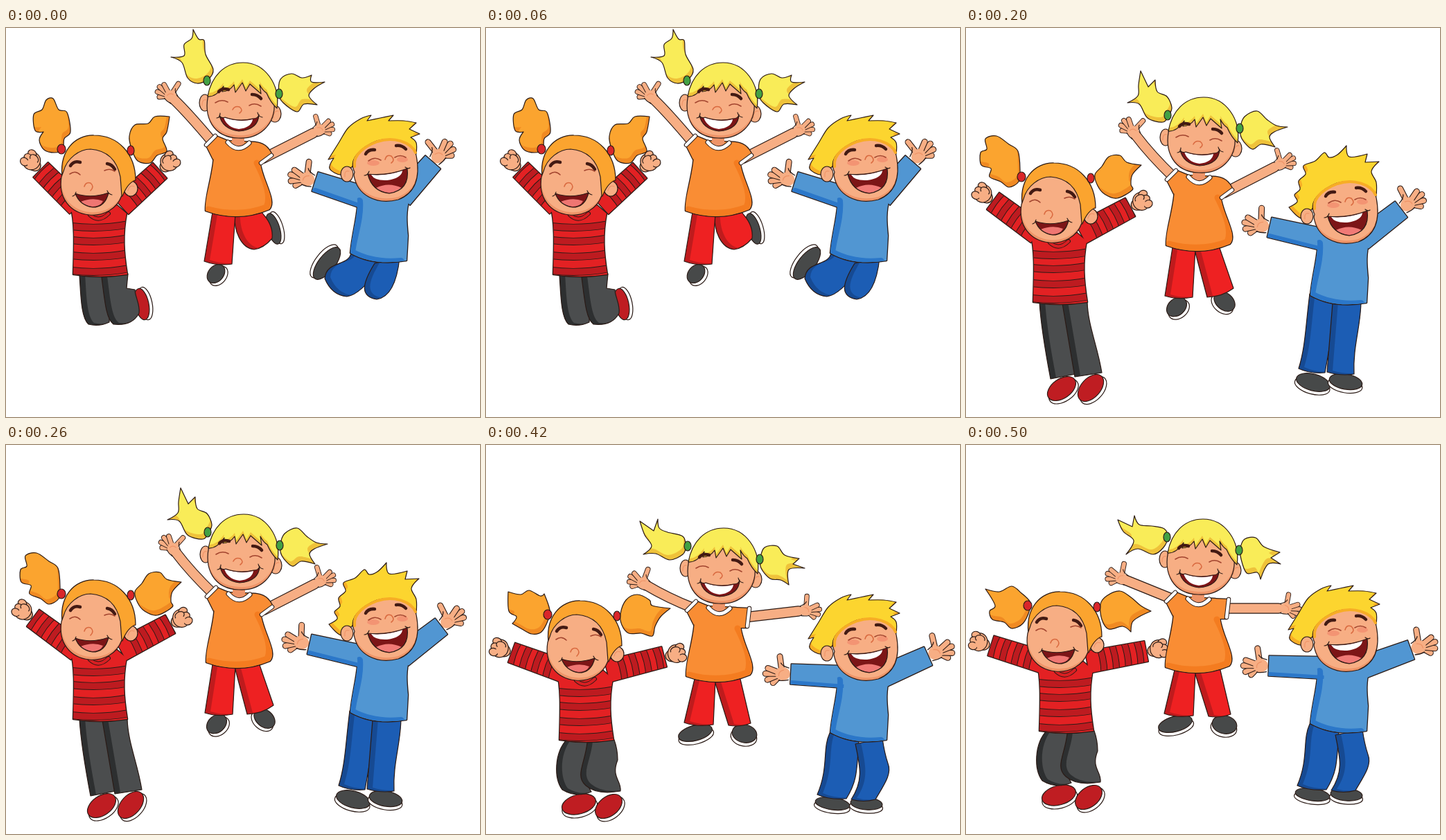
An HTML page with a canvas that plays this animation: 684 by 562 pixels, repeating every 0.6 s.

```html
<!DOCTYPE html>
<html lang="en">
<head>
<meta charset="utf-8">
<title>Jumping children</title>
<style>
html, body { margin: 0; width: 684px; height: 562px; overflow: hidden; background: #fff }
canvas { display: block }
</style>
</head>
<body>
<canvas width="684" height="562"></canvas>
<script>
const ctx = document.querySelector('canvas').getContext('2d');
const INK = '#2b1b16', SKIN = '#f7ae84', SKIN_DARK = '#ee9468', LIP = '#7c1517';
const path = d => new Path2D(d);
const points = s => s.split(',').map(p => p.trim().split(' ').map(Number));

function at(x, y, draw) {
  ctx.save();
  ctx.translate(x, y);
  draw();
  ctx.restore();
}

function line(d, color = INK, width = 1.2) {
  ctx.strokeStyle = color;
  ctx.lineWidth = width;
  ctx.stroke(typeof d === 'string' ? path(d) : d);
}

function fill(d, color) {
  ctx.fillStyle = color;
  ctx.fill(typeof d === 'string' ? path(d) : d);
}

// Fills a shape, leaving a darker band on the side opposite to (dx, dy).
function shade(d, light, dark, dx, dy) {
  const p = typeof d === 'string' ? path(d) : d;
  fill(p, dark);
  ctx.save();
  ctx.clip(p);
  ctx.translate(dx, dy);
  fill(p, light);
  ctx.restore();
  line(p);
}

function oval(x, y, rx, ry, color, outline = true) {
  const p = new Path2D();
  p.ellipse(x, y, rx, ry, 0, 0, 7);
  fill(p, color);
  if (outline) line(p);
}

// Closed smooth curve through points; sharp turns stay pointed.
function spline(s) {
  const pts = points(s), n = pts.length, p = new Path2D();
  const tangent = pts.map(([x, y], i) => {
    const [ax, ay] = pts[(i + n - 1) % n], [bx, by] = pts[(i + 1) % n];
    const dot = (x - ax) * (bx - x) + (y - ay) * (by - y);
    return dot < 0 ? [0, 0] : [(bx - ax) / 6, (by - ay) / 6];
  });
  p.moveTo(...pts[0]);
  pts.forEach(([x, y], i) => {
    const j = (i + 1) % n, [u, v] = pts[j];
    p.bezierCurveTo(x + tangent[i][0], y + tangent[i][1], u - tangent[j][0], v - tangent[j][1], u, v);
  });
  p.closePath();
  return p;
}

function sleeve([x, y], [u, v], w1, w2) {
  const a = Math.atan2(v - y, u - x), s = Math.sin(a) / 2, c = Math.cos(a) / 2, p = new Path2D();
  p.moveTo(x - s * w1, y + c * w1);
  p.lineTo(u - s * w2, v + c * w2);
  p.lineTo(u + s * w2, v - c * w2);
  p.lineTo(x + s * w1, y - c * w1);
  p.closePath();
  return p;
}

// Outlines all parts first so that they merge into one silhouette.
function merge(parts, color) {
  parts.forEach(p => line(p, INK, 2.6));
  parts.forEach(p => fill(p, color));
}

// Runs draw with the origin beyond the end of an arm and x along it; the thumb is at -y.
function handAt([x, y], [u, v], reach, left, draw) {
  at(u, v, () => {
    ctx.rotate(Math.atan2(v - y, u - x));
    ctx.translate(reach, 0);
    if (left) ctx.scale(1, -1);
    draw();
  });
}

function fist() {
  oval(-5, 1, 11, 9, SKIN);
  oval(0, 0, 12, 13, SKIN);
  [-8, 0, 8].forEach(y => oval(7, y, 6.5, 5.5, SKIN));
  oval(0, -5, 7, 5, SKIN);
  oval(-3, 2, 8, 7, SKIN, false);
}

function openHand(size) {
  ctx.scale(size, size);
  for (const [a, len] of [[.85, 17], [.45, 21], [.05, 22], [-.32, 20], [-1.4, 23]]) {
    const d = `M0 ${a < -1 ? -2 : 0}L${len * Math.cos(a)} ${len * Math.sin(a)}`;
    line(d, INK, 8.4);
    line(d, SKIN, 6.4);
  }
  oval(-1, 0, 10, 9, SKIN, false);
  line('M-9 -8Q0 -10 2 -14M-9 8Q-2 10 4 9');
  line('M-2 -5Q5 -3 4 3', SKIN_DARK);
}

function shoe([x, y, rx, ry, deg], color) {
  at(x, y, () => {
    ctx.rotate(deg * Math.PI / 180);
    oval(0, 5, rx, ry, '#fff');
    oval(0, 0, rx - 1, ry, color);
  });
}

// The landing pose keeps its legs and rises slightly on the last beat.
function legs(kid, f) {
  const i = Math.min(f, 3), [light, dark, shoes] = kid.colors;
  at(0, f > 3 ? -13 : 0, () => {
    points(kid.shoes[i]).forEach(s => shoe(s, shoes));
    kid.legs[i].split('|').forEach(d => shade(d, light, dark, 8, -2));
  });
}

function tails(kid, f, light, dark) {
  [kid.leftTail[f], kid.rightTail[f]].forEach(s => shade(spline(s), light, dark, -3, -7));
}

const redGirl = {
  move: points('0 0,0 21,0 40,9 70,9 57'),
  cuffs: ['50 205,222 206', '60 215,213 220', '39 250,237 259', '37 300,257 306', '36 290,260 298'],
  colors: ['#4b4d4e', '#2d2f30', '#bf1d22'],
  shoes: ['196 399 24 10 -102', '159 486 18 11 -15,203 466 25 11 -70',
    '138 521 24 14 -35,180 520 24 14 -48', '134 519 26 14 -15,177 522 23 14 -38'],
  legs: [
    'M106 357C108 385 108 418 119 428Q134 432 149 425L152 357Z|M138 360C143 400 145 420 155 428Q182 431 192 412C194 400 186 388 186 378L174 376L176 355Z',
    'M107 378C105 405 117 445 135 474Q150 481 167 472C150 440 148 410 150 378Z|M139 380C143 415 145 460 174 472Q188 476 196 460C182 430 178 400 176 378Z',
    'M106 396C108 430 115 470 122 507L158 500L150 396Z|M139 398L157 504L196 498C190 460 176 430 175 396Z',
    'M117 425C98 445 98 482 110 498Q130 510 152 501C142 485 138 470 150 427Z|M146 430C143 460 128 478 144 492Q160 506 194 500C196 485 180 480 190 455Q190 440 185 426Z'],
  leftTail: [
    '82 176,70 180,55 176,48 162,54 150,42 148,40 125,52 118,58 104,68 102,76 118,88 122,93 150,84 160',
    '80 194,63 193,51 183,57 170,53 152,65 140,63 128,78 122,95 119,100 132,107 148,104 165,94 178,90 190',
    '76 222,62 230,50 222,34 215,36 203,22 198,21 180,30 175,28 160,44 156,62 168,75 178,78 205',
    '90 252,80 270,66 273,52 266,38 258,44 248,33 240,32 212,50 216,62 210,78 218,84 215,92 238',
    '92 238,82 258,66 265,55 256,38 252,34 240,42 232,28 208,48 212,66 204,80 214,92 226'],
  rightTail: [
    '181 174,178 156,186 140,205 138,215 128,236 128,232 150,226 160,232 178,218 184,208 195,190 192',
    '178 194,169 182,170 162,184 155,196 142,217 136,216 152,228 160,222 174,229 184,216 196,206 210,190 208',
    '186 212,196 200,206 186,222 184,232 194,253 198,240 212,238 226,240 234,218 246,200 240,190 228',
    '194 244,202 224,218 216,236 224,240 232,266 236,252 248,244 262,240 276,224 272,206 272,196 260',
    '194 230,203 218,222 211,238 220,252 232,267 240,250 248,240 256,238 270,226 262,206 266,196 252'],

  draw(f) {
    const [dx, dy] = this.move[f], cuffs = points(this.cuffs[f]);
    const shoulders = [[103 + dx, 257 + dy], [166 + dx, 257 + dy]];
    const arms = cuffs.map((c, i) => sleeve(shoulders[i], c, 32, 30));
    const torso = new Path2D();
    torso.addPath(path('M93 258C100 280 98 320 97 356Q135 362 175 356C170 325 168 300 174 268L160 256Q130 280 105 256Z'), { e: dx, f: dy });
    tails(this, f, '#fba42f', '#f08a22');
    legs(this, f);
    cuffs.forEach((c, i) => handAt(shoulders[i], c, 18, !i, fist));
    merge([...arms, torso], '#e32123');
    arms.forEach((arm, i) => {
      const [x, y] = shoulders[i], [u, v] = cuffs[i];
      ctx.save();
      ctx.clip(arm);
      ctx.translate(x, y);
      ctx.rotate(Math.atan2(v - y, u - x));
      for (let s = 20; s < 90; s += 18) {
        line(`M${s} -25Q${s + 6} 0 ${s} 25`, INK, 10);
        line(`M${s} -25Q${s + 6} 0 ${s} 25`, '#bd1b20', 8);
      }
      ctx.restore();
    });
    ctx.save();
    ctx.clip(torso);
    ctx.translate(dx, dy);
    for (const y of [286, 306, 328, 350]) {
      line(`M90 ${y}Q135 ${y + 6} 180 ${y - 3}`, INK, 11);
      line(`M90 ${y}Q135 ${y + 6} 180 ${y - 3}`, '#bd1b20', 9.4);
    }
    ctx.restore();
    at(dx, dy, () => this.head());
  },

  head() {
    line('M121 270Q134 282 148 268', INK, 6);
    line('M121 270Q134 282 148 268', '#d81f22', 4);
    oval(180, 232, 10, 11, SKIN);
    line('M176 235Q178 226 185 229', SKIN_DARK);
    shade('M82 222C74 178 100 154 127 155C162 155 187 182 187 220C180 222 173 230 168 243L100 240Z', '#fba42f', '#ef8a20', 2, -3);
    shade('M83 207C88 188 106 175 122 175C146 177 160 190 165 215L167 242C160 262 140 272 120 270C92 267 75 245 80 215Z', SKIN, SKIN_DARK, 1, -4);
    oval(80, 175, 6, 7, '#d9262a');
    oval(180, 177, 5, 7, '#d9262a');
    line('M93 199Q98 191 107 194M146 196Q153 197 157 204', '#431a13', 4.5);
    line('M92 211Q100 205 107 212M142 206Q150 202 157 207', '#a3452f', 1.6);
    line('M113 229Q115 222 122 224Q128 229 122 235', '#d9693f', 1.6);
    fill('M100 239Q122 247 148 238Q143 259 125 259Q106 256 100 239Z', LIP);
    fill('M108 251Q125 244 140 250Q136 258 125 258Q114 257 108 251Z', '#ef7672');
    line('M96 243Q100 242 101 237M146 235Q148 240 153 241M100 239Q122 247 148 238Q143 259 125 259Q106 256 100 239');
  }
};

const blondeGirl = {
  move: points('0 0,0 21,1 50,1 70,0 57'),
  arms: ['262 122,242 103,443 152', '264 143,257 112,441 157', '266 183,245 155,445 201',
    '262 221,232 203,451 240', '262 208,230 195,451 236'],
  colors: ['#ee2122', '#bf1b1d', '#474949'],
  shoes: ['303 355 16 11 -50,386 290 24 9 -107', '304 374 17 11 -50,384 343 24 10 -72',
    '304 403 17 12 -40,373 395 18 12 40', '302 416 26 11 -15,373 417 19 13 12'],
  legs: [
    'M330 266C328 295 340 318 358 320Q372 318 384 304Q386 286 372 270L366 262Z|M298 266L286 337Q305 344 326 341L331 268Z',
    'M329 288C332 320 345 345 372 355Q384 345 384 322Q370 310 365 285Z|M298 288L286 358Q305 364 326 360L331 290Z',
    'M329 317L348 389Q370 388 386 376L365 315Z|M298 317L287 387Q305 393 327 389L331 318Z',
    'M329 338L350 405Q366 408 382 402L366 334Z|M301 338L286 401Q305 408 328 404L331 340Z'],
  leftTail: [
    '292 74,299 60,288 38,286 18,278 16,270 2,268 15,257 24,257 40,238 42,254 50,262 72,276 80',
    '292 97,304 82,303 68,297 55,304 42,293 44,287 20,275 42,262 50,247 53,260 60,264 88,276 98',
    '292 127,297 115,290 99,276 92,273 75,263 85,252 62,249 82,248 98,233 108,250 110,262 130,284 136',
    '288 147,284 132,262 126,250 120,248 107,242 124,222 110,229 130,239 146,227 158,245 157,265 166,284 158',
    '291 133,286 121,268 117,250 115,243 102,240 118,219 108,227 125,242 138,231 158,248 150,270 158,285 148'],
  rightTail: [
    '394 96,396 74,412 66,427 72,441 68,441 78,460 78,445 87,437 98,449 111,430 110,420 121,400 108',
    '394 116,397 90,408 78,425 82,434 62,437 75,447 71,440 87,455 102,440 103,436 124,418 128,400 117',
    '396 144,402 128,420 120,434 132,448 141,464 143,445 150,438 158,446 172,426 168,413 175,398 160',
    '396 163,402 148,420 146,431 159,452 164,443 172,460 178,437 180,437 202,425 195,410 193,397 178',
    '396 149,402 136,418 134,430 147,453 155,440 163,454 172,436 172,425 194,420 184,405 185,397 165'],

  draw(f) {
    const [dx, dy] = this.move[f], [elbow, wrist, rightWrist] = points(this.arms[f]);
    const low = f > 2, left = [299 + dx, 166 + dy], right = [372 + dx, (low ? 179 : 188) + dy];
    const arm = `M${left}Q${elbow} ${wrist}M${right}L${rightWrist}`;
    tails(this, f, '#f9ec58', '#efc23a');
    legs(this, f);
    line(arm, INK, 15.4);
    line(arm, SKIN, 13);
    handAt(elbow, wrist, 7, true, () => openHand(.92));
    handAt(right, rightWrist, 11, false, () => openHand(.88));
    at(dx, dy, () => {
      this.shirt(low);
      this.head();
    });
  },

  shirt(low) {
    const cuff = low ? 'M379 166L376 192' : 'M383 184L368 195';
    const parts = [
      'M318 163Q300 172 299 195C295 225 287 245 288 264Q335 281 380 262C392 250 368 218 366 190L360 165Z',
      'M320 163L303 156L289 170L299 190Z',
      low ? 'M355 165L379 166L376 194L362 194Z' : 'M355 165Q376 164 384 184L368 197L362 190Z'].map(path);
    merge(parts, '#f98d34');
    ctx.save();
    ctx.clip(parts[0]);
    line('M292 262Q338 274 376 259Q385 240 362 195', '#f47c20', 9);
    ctx.restore();
    line('M302 156L289 169' + cuff, INK, 6.5);
    line('M302 156L289 169' + cuff, '#fff', 4.5);
    line('M335 152L335 166', SKIN_DARK, 18);
    line('M320 165Q335 182 351 166', INK, 7);
    line('M320 165Q335 182 351 166', '#fff', 5);
  },

  head() {
    oval(287, 108, 8, 12, SKIN);
    oval(388, 124, 9, 12, SKIN);
    line('M283 112Q283 102 289 104M386 130Q386 119 393 120', SKIN_DARK);
    shade('M293 92C283 130 300 158 335 159C365 161 390 140 387 106L378 80L302 76Z', SKIN, SKIN_DARK, 0, -4);
    shade('M291 99C296 70 315 50 342 50C374 50 396 82 391 116Q382 108 376 94Q370 90 366 82L368 95L352 81L346 91L341 79L331 93L329 82Q322 92 312 92L314 84Q303 100 291 99Z', '#f9ec58', '#efc23a', 0, -5);
    for (const [x, y] of [[290, 76], [394, 95]]) oval(x, y, 5, 7, '#42a044');
    line('M307 92Q312 86 321 89M355 96Q363 96 368 102', '#431a13', 4.5);
    line('M302 108Q311 102 320 107M351 112Q359 107 368 113', '#a3452f', 1.6);
    line('M327 118Q330 112 337 114Q343 119 337 123', '#d9693f', 1.6);
    fill('M308 126Q310 131 316 129Q336 136 356 131Q364 131 365 125Q364 147 336 149Q312 146 308 126Z', LIP);
    fill('M314 129Q336 137 356 132Q354 144 336 146Q319 144 314 129Z', '#fff');
    line('M304 130Q309 130 309 123M363 122Q364 128 370 129M308 126Q310 131 316 129Q336 136 356 131Q364 131 365 125Q364 147 336 149Q312 146 308 126');
  }
};

const boy = {
  move: points('0 0,0 22,0 61,0 90,0 77'),
  cuffs: ['446 222,616 194', '458 227,608 203', '438 288,628 262', '440 331,638 305', '437 319,642 296'],
  colors: ['#1c5db4', '#164a93', '#474949'],
  shoes: ['463 340 29 12 128', '462 432 27 13 60,519 446 17 10 40',
    '501 512 26 12 15,548 511 25 11 10', '500 518 26 9 8,549 518 24 9 5'],
  legs: [
    'M498 324C496 345 462 335 460 362Q470 386 492 388Q512 385 540 345L540 330Z|M532 340C512 372 512 388 535 392Q562 388 568 332Z',
    'M497 346C486 370 492 398 486 402Q460 400 457 407Q455 430 468 440Q515 442 530 412L545 356Z|M538 360C530 400 528 420 515 437L533 446Q565 420 567 402L570 355Z',
    'M496 384C490 430 490 460 480 492Q497 500 518 498L536 395Z|M529 398L521 497Q540 503 560 500C558 460 570 430 570 394Z',
    'M496 416C485 440 495 465 478 505Q495 513 520 511C536 485 535 470 538 428Z|M533 432C540 465 545 485 527 512Q545 517 562 512C575 490 586 475 580 460Q575 445 572 424Z'],
  hair: [
    '484 212,467 203,473 188,465 190,480 166,494 144,512 131,527 126,521 134,540 130,559 126,552 134,574 134,592 137,582 146,597 153,584 158,592 166,592 182,560 172,520 182,500 200',
    '484 214,466 198,478 190,474 180,482 172,480 160,490 150,487 138,504 131,517 119,524 126,536 122,549 109,553 125,579 121,576 133,596 132,585 146,592 162,592 182,560 172,520 182,500 200'],

  draw(f) {
    const dy = this.move[f][1], cuffs = points(this.cuffs[f]);
    const shoulders = [[517, 245 + dy], [571, 245 + dy]];
    const arms = cuffs.map((c, i) => sleeve(shoulders[i], c, 32, 29));
    const torso = new Path2D();
    torso.addPath(path('M505 238C512 258 500 290 497 325Q530 344 578 336L580 300C578 280 577 265 582 248L560 240Z'), { e: 0, f: dy });
    legs(this, f);
    cuffs.forEach((c, i) => handAt(shoulders[i], c, 13, !i, () => openHand(1.08)));
    merge([...arms, torso], '#5196d2');
    ctx.save();
    ctx.clip(torso);
    at(0, dy, () => line('M510 250C512 275 502 300 499 324Q530 341 570 337', '#2b77c9', 10));
    ctx.restore();
    const [u, v] = cuffs[0];
    ctx.save();
    ctx.clip(arms[0]);
    line(`M${u} ${v + 14}L517 ${261 + dy}`, '#2b77c9', 10);
    ctx.restore();
    at(0, dy, () => this.head(this.hair[f === 1 || f === 2 ? 1 : 0]));
  },

  head(hair) {
    shade(spline(hair), '#fcd52f', '#f7ad25', 3, -5);
    oval(492, 211, 9, 11, SKIN);
    line('M489 215Q488 205 495 207', SKIN_DARK);
    shade('M503 208C493 190 512 172 535 163C560 156 586 165 592 184C598 215 592 238 566 248C535 256 506 242 502 212Z', SKIN, SKIN_DARK, 0, -4);
    line('M503 200C500 182 520 170 536 164C560 156 584 165 591 180', '#f7ad25', 4);
    oval(530, 195, 9, 4, '#f39473', false);
    oval(572, 190, 8, 4, '#f39473', false);
    line('M519 182Q523 175 532 176M563 170Q571 169 577 175', '#431a13', 4.5);
    line('M523 192Q532 185 541 191M561 187Q569 182 577 187', '#a3452f', 1.6);
    line('M547 190Q549 182 556 185Q562 191 556 195', '#d9693f', 1.6);
    fill('M522 211Q551 214 579 203Q583 234 553 239Q528 236 522 211Z', LIP);
    fill('M527 212Q550 214 572 206Q571 217 550 220Q532 221 527 212Z', '#fff');
    fill('M534 231Q552 222 571 231Q564 238 553 238Q541 237 534 231Z', '#f07a76');
    line('M517 213Q522 213 524 207M576 201Q580 204 583 202M522 211Q551 214 579 203Q583 234 553 239Q528 236 522 211');
  }
};

const beats = [0, 1, 2, 3, 3, 4];

function render(now) {
  const pose = beats[Math.floor(now / 100) % beats.length];
  ctx.fillStyle = '#fff';
  ctx.fillRect(0, 0, 684, 562);
  ctx.lineJoin = 'round';
  for (const kid of [redGirl, blondeGirl, boy]) {
    ctx.lineCap = 'round';
    kid.draw(pose);
  }
  requestAnimationFrame(render);
}
requestAnimationFrame(render);
</script>
</body>
</html>
```
